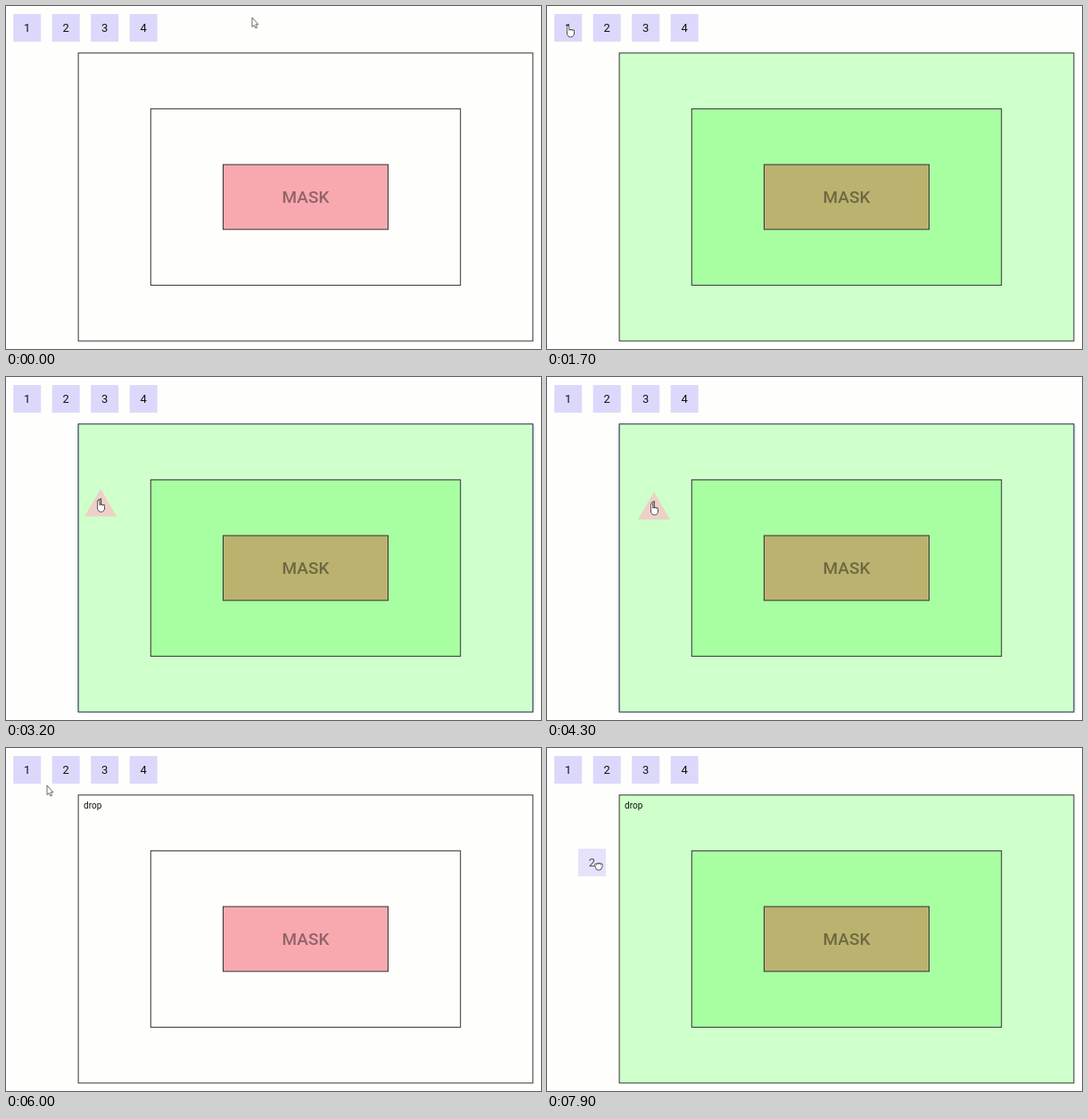
An HTML page with a canvas that plays this animation: 600 by 385 pixels, repeating every 8 s.

```html
<!DOCTYPE html>
<html lang="en">
<head>
<meta charset="utf-8">
<style>
html, body { margin: 0; width: 100%; height: 100%; overflow: hidden; background: #fefefc; }
canvas { display: block; }
</style>
</head>
<body>
<canvas id="stage" width="600" height="385"></canvas>
<script>
const ctx = document.getElementById('stage').getContext('2d');
const LOOP = 8000, STEP = 100;
const FONT = 'Roboto, Arial, sans-serif';
const BOX = 31, PITCH = 43.5, LEFT = 8.2, TOP = 9;
const CENTER = { x: 336, y: 214.4 };
const LINE = '#333', GLOW = '#2a2a50';

// Each move eases out to its end point; bend bows the path sideways
const start = { x: 276, y: 13 };
const moves = [
  { from: 100, to: 1000, x: 23.5, y: 24, bend: 0 },
  { from: 1700, to: 2500, x: 37.5, y: 124, bend: 8 },
  { from: 2500, to: 3700, x: 117.5, y: 144, bend: 0 },
  { from: 4700, to: 5900, x: 46, y: 42, bend: 0 },
  { from: 6000, to: 6600, x: 75, y: 29, bend: -12 },
  { from: 6900, to: 7100, x: 63, y: 31, bend: 0 },
  { from: 7100, to: 7900, x: 58, y: 133, bend: 0 }
];

const drags = [
  { n: 1, from: 1700, to: 4400, dx: -15.5, dy: -15, cursor: pointHand },
  { n: 2, from: 7000, to: LOOP, dx: -23, dy: -20, cursor: fist }
];

function pointerAt(t) {
  let p = start;
  for (const m of moves) {
    if (t <= m.from) break;
    const k = 1 - (1 - Math.min(1, (t - m.from) / (m.to - m.from))) ** 2;
    const dx = m.x - p.x, dy = m.y - p.y;
    const bow = 4 * k * (1 - k) * m.bend / Math.hypot(dx, dy);
    p = { x: p.x + dx * k - dy * bow, y: p.y + dy * k + dx * bow };
  }
  return p;
}

function label(text, x, y, size, color = '#111', weight = 400, align = 'center') {
  ctx.font = `${weight} ${size}px ${FONT}`;
  ctx.textAlign = align;
  ctx.fillStyle = color;
  ctx.fillText(text, x, y);
}

function tile(n, x, y) {
  ctx.fillStyle = '#dcd8fb';
  ctx.fillRect(x, y, BOX, BOX);
  label(n, x + BOX / 2, y + 20, 13);
}

function zones(active, over) {
  const fills = active ? ['#cfffcb', '#a8ffa2', '#bbb26f'] : ['#fefefc', '#fefefc', '#f8a9b0'];
  fills.forEach((fill, i) => {
    const x = 81.1 + 81.2 * i, y = 52.8 + 62.6 * i;
    const rect = [x, y, 2 * (CENTER.x - x), 2 * (CENTER.y - y)];
    const lit = over && i === 0;
    ctx.save();
    ctx.fillStyle = fill;
    ctx.strokeStyle = lit ? GLOW : LINE;
    if (lit) {
      ctx.shadowColor = 'rgba(60,60,150,.5)';
      ctx.shadowBlur = 3;
    }
    ctx.fillRect(...rect);
    ctx.shadowBlur = 0;
    ctx.strokeRect(...rect);
    ctx.restore();
  });
  label('MASK', CENTER.x, 221, 19, 'rgba(0,0,0,.41)', 500);
}

function clone(drag, p, over) {
  const x = p.x + drag.dx, y = p.y + drag.dy;
  ctx.save();
  if (over) {
    ctx.fillStyle = '#eed0c7';
    ctx.beginPath();
    ctx.moveTo(x + 18, y);
    ctx.lineTo(x + 36, y + BOX);
    ctx.lineTo(x, y + BOX);
    ctx.fill();
    label(drag.n, x + 18, y + 19, 13, '#444');
  } else {
    ctx.globalAlpha = 0.7;
    tile(drag.n, x, y);
  }
  ctx.restore();
}

function arrow(x, y) {
  ctx.save();
  ctx.translate(x, y);
  const p = new Path2D('M0 0V10.5L2.3 8.5L4 12L5.6 11.2L4 7.8H7Z');
  ctx.fillStyle = '#fff';
  ctx.strokeStyle = '#444';
  ctx.lineWidth = 0.8;
  ctx.fill(p);
  ctx.stroke(p);
  ctx.restore();
}

// A palm with four fingers: dark pass first, then a thinner white pass
function hand(x, y, palm, lengths, spread) {
  ctx.save();
  ctx.lineCap = 'round';
  for (const [color, edge] of [['#333', 0.75], ['#fff', 0]]) {
    ctx.strokeStyle = ctx.fillStyle = color;
    ctx.lineWidth = 1.5 + 2 * edge;
    lengths.forEach((len, i) => {
      const side = i - 1.5, base = x + side * 1.8;
      ctx.beginPath();
      ctx.moveTo(base, y);
      ctx.lineTo(base + side * spread, y - len);
      ctx.stroke();
    });
    ctx.beginPath();
    ctx.arc(x, y, palm + edge, 0, 2 * Math.PI);
    ctx.fill();
  }
  ctx.restore();
}

function openHand(x, y) {
  hand(x, y + 1.5, 2.9, [4.2, 5.6, 5.6, 4], 0.9);
}

function pointHand(x, y) {
  hand(x + 3, y + 7, 3.4, [8, 3.6, 3.4, 3], 0.2);
}

function fist(x, y) {
  hand(x, y + 0.8, 2.9, [2.8, 3.5, 3.5, 2.8], 0.3);
}

function onTile(p) {
  const col = p.x - LEFT;
  return p.y >= TOP && p.y < TOP + BOX && col >= 0 && col < 4 * PITCH && col % PITCH < BOX;
}

function render(t) {
  const p = pointerAt(t);
  const drag = drags.find(d => t >= d.from && t < d.to);
  const over = !!drag && p.x > 81 && p.y > 53;
  ctx.fillStyle = '#fefefc';
  ctx.fillRect(0, 0, 600, 385);
  zones(!!drag, over);
  if (t >= drags[0].to) label('drop', 87, 68, 10, '#111', 400, 'left');
  for (let i = 0; i < 4; i++) tile(i + 1, LEFT + i * PITCH, TOP);

  // The clone follows shortly after the grab
  if (drag && t > drag.from + STEP) clone(drag, p, over);
  const cursor = drag ? drag.cursor : onTile(p) ? openHand : arrow;
  cursor(p.x, p.y);
}

function tick(now) {
  render(Math.floor((now % LOOP) / STEP) * STEP);
  requestAnimationFrame(tick);
}
requestAnimationFrame(tick);
</script>
</body>
</html>
```
